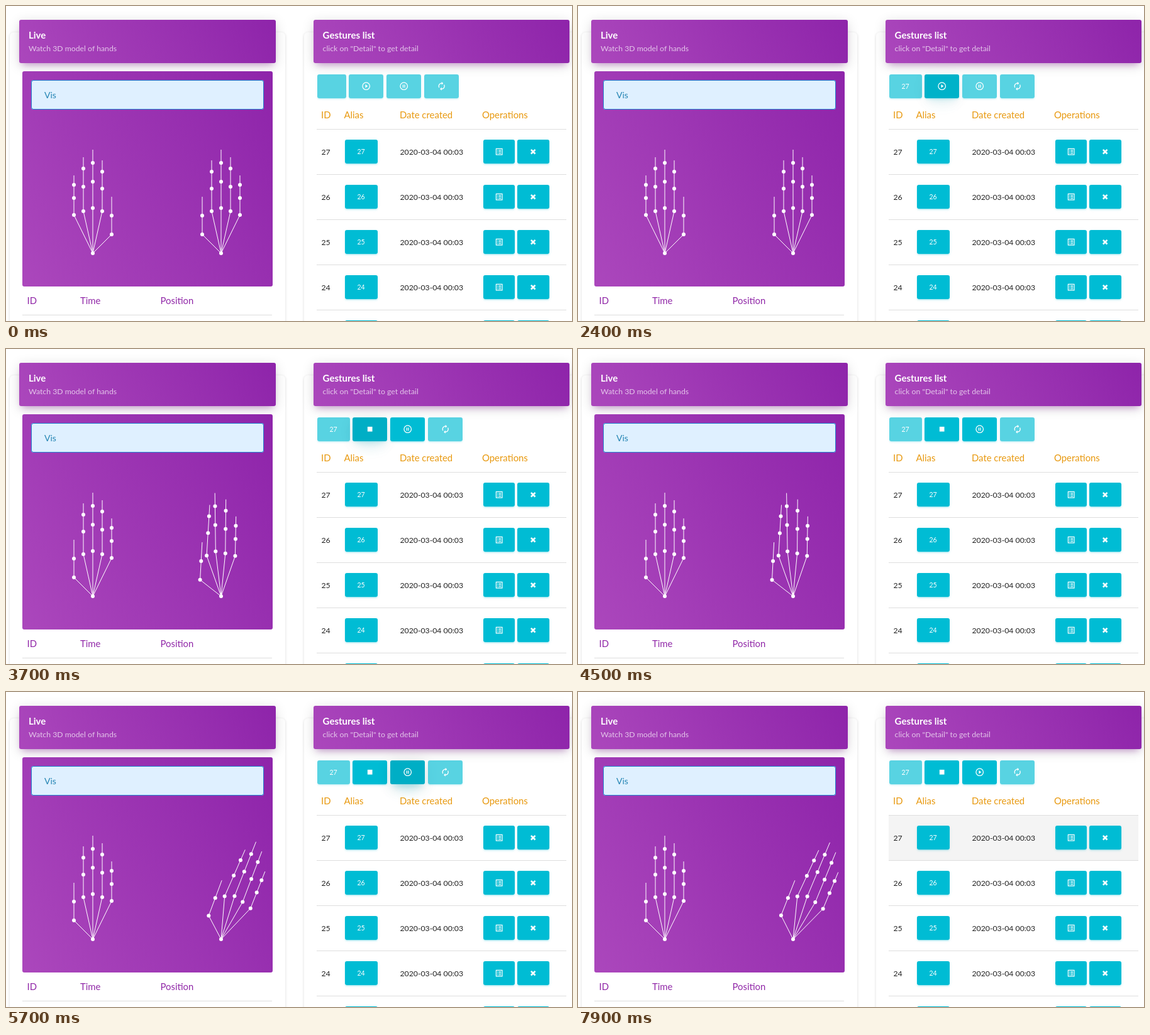
An HTML page with a canvas that plays this animation: 900 by 502 pixels, repeating every 8 s.

```html
<!DOCTYPE html>
<html lang="en">
<head>
<meta charset="utf-8">
<title>Gestures</title>
<style>
html, body { margin: 0; width: 100%; height: 100%; overflow: hidden; background: #fff; }
#stage { position: relative; width: 900px; height: 502px; overflow: hidden; font-family: Lato, sans-serif; }
#stage div, #stage span, canvas, svg { position: absolute; }
span { line-height: 20px; white-space: pre; }
.card { background: #fff; border-radius: 6px; box-shadow: 0 1px 4px rgba(0,0,0,.14); }
.purple { background: linear-gradient(60deg, #ab47bc, #8e24aa); border-radius: 3px; }
.head { box-shadow: 0 4px 20px rgba(0,0,0,.14), 0 7px 10px -5px rgba(156,39,176,.4); }
.vis { background: #dff0ff; border-radius: 4px; box-shadow: inset 0 0 0 1px #2185d0; }
.line { background: #dedede; }
.hover { background: #f4f4f4; }
.btn { border-radius: 3px; background: #00bcd4; }
svg { fill: #fff; stroke: none; }
svg .o { fill: none; stroke: #fff; stroke-width: 2; }
</style>
</head>
<body>
<div id="stage"></div>
<script>
const stage = document.getElementById('stage');
const LOOP = 8000, STEP = 100;
const TD = 12.25, TH = 14.875, SMALL = 10.5;
const INK = 'rgba(0,0,0,.87)', ORANGE = '#e8990f', PURPLE = '#9128a8';

const ring = '<circle class="o" cx="12" cy="12" r="9"/>';
const icons = {
  play: ring + '<path d="M10 7.5v9l6-4.5z"/>',
  pause: ring + '<path d="M9 8h2v8H9zM13 8h2v8h-2z"/>',
  stop: '<path d="M6 6h12v12H6z"/>',
  renew: '<path d="M12 6v3l4-4-4-4v3c-4.42 0-8 3.58-8 8 0 1.57.46 3.03 1.24 4.26L6.7 14.8c-.45-.83-.7-1.79-.7-2.8 0-3.31 2.69-6 6-6z"/>' +
    '<path d="M12 6v3l4-4-4-4v3c-4.42 0-8 3.58-8 8 0 1.57.46 3.03 1.24 4.26L6.7 14.8c-.45-.83-.7-1.79-.7-2.8 0-3.31 2.69-6 6-6z" transform="rotate(180 12 12)"/>',
  list: '<rect class="o" x="4" y="4" width="16" height="16"/><path d="M7 7h2v2H7zM7 11h2v2H7zM7 15h2v2H7zM11 7h6v2h-6zM11 11h6v2h-6zM11 15h6v2h-6z"/>',
  close: '<path class="o" style="stroke-width:4.4" d="M6.5 6.5l11 11M17.5 6.5l-11 11"/>'
};

function box(cls, x, y, w, h, parent = stage) {
  const el = document.createElement('div');
  el.className = cls;
  el.style.cssText = `left:${x}px;top:${y}px;width:${w}px;height:${h}px`;
  parent.append(el);
  return el;
}

function text(str, x, baseline, size, color, bold, parent = stage) {
  const el = document.createElement('span');
  const up = Math.round(size * .987), down = Math.round(size * .213);
  const top = baseline - up - Math.floor((20 - up - down) / 2);
  el.textContent = str;
  el.style.cssText = `left:${x}px;top:${top}px;font-size:${size}px;color:${color};font-weight:${bold ? 700 : 400}`;
  parent.append(el);
  return el;
}

function setIcon(btn, name, size = 15.4) {
  if (btn.icon === name) return;
  btn.icon = name;
  const x = (btn.offsetWidth - size) / 2, y = (38 - size) / 2;
  btn.innerHTML = `<svg viewBox="0 0 24 24" width="${size}" height="${size}" style="left:${x}px;top:${y}px">${icons[name]}</svg>`;
}

// Blend a button between rest (0) and hovered (1)
function setHover(btn, k, depth = k) {
  const tint = a => `rgba(0,188,212,${a})`;
  const rest = 1 - depth;
  btn.style.background = `rgb(0,${188 - 14 * k},${212 - 15 * k})`;
  btn.style.boxShadow = [
    `0 2px 2px ${tint(.14 * rest)}`, `0 3px 1px -2px ${tint(.2 * rest)}`, `0 1px 5px ${tint(.12 * rest)}`,
    `0 14px 26px -12px ${tint(.42 * depth)}`, `0 4px 23px rgba(0,0,0,${.12 * depth})`, `0 8px 10px -5px ${tint(.2 * depth)}`
  ].join();
}

function button(x, y, w, icon, size) {
  const el = box('btn', x, y, w, 38);
  setHover(el, 0);
  if (icon) setIcon(el, icon, size);
  return el;
}

function header(x, w, title, sub) {
  box('purple head', x, 22, w, 69);
  text(title, x + 15, 52, 15, '#fff', true);
  text(sub, x + 15, 72, TD, 'rgba(255,255,255,.7)');
}

// Left panel
box('card', 6, 42, 438, 520);
header(21, 408, 'Live', 'Watch 3D model of hands');
box('purple', 26, 104, 398, 343);
box('vis', 40, 118, 370, 47);
text('Vis', 61, 147, 14, '#2384b3');
text('ID', 33.5, 475, TH, PURPLE);
text('Time', 118, 475, TH, PURPLE);
text('Position', 245.5, 475, TH, PURPLE);
box('line', 26, 492, 397, 1);

// Right panel
box('card', 474, 42, 438, 520);
header(488.6, 407.4, 'Gestures list', 'click on "Detail" to get detail');
const rowBg = box('hover', 494, 197, 397, 71);
[['ID', 501], ['Alias', 537.5], ['Date created', 626], ['Operations', 757]]
  .forEach(([s, x]) => text(s, x, 179, TH, ORANGE));

const aliases = [];
for (let i = 0; i < 5; i++) {
  const y = 196 + 72 * i, id = String(27 - i);
  box('line', 494, y, 397, 1);
  text(id, 501.5, y + 41, TD, INK);
  const alias = button(539, y + 17, 52);
  text(id, 19.5, 23, SMALL, '#fff', false, alias);
  aliases.push(alias);
  text('2020-03-04 00:03', 626.5, y + 41, TD, INK);
  button(759, y + 17, 50, 'list', 14.4);
  button(813, y + 17, 51, 'close', 14.4);
}

const pick = button(495, 109, 46);
const label = text('27', 19.5, 23, SMALL, '#fff', false, pick);
const tools = [
  button(545, 109, 55, 'play'),
  button(605, 109, 55, 'pause'),
  button(665, 109, 55, 'renew')
];
pick.style.opacity = tools[2].style.opacity = .65;

// Hands
const canvas = document.createElement('canvas');
canvas.width = 398;
canvas.height = 343;
canvas.style.cssText = 'left:26px;top:104px';
stage.append(canvas);
const ctx = canvas.getContext('2d');
ctx.translate(-26, -104);
ctx.strokeStyle = ctx.fillStyle = '#fff';

// Side offset, then joint heights above the wrist, thumb first
const fingers = [
  [-30, 30, 60, 90],
  [-15, 67, 103, 130, 148],
  [0, 72, 114, 144, 165],
  [15, 67, 106, 135, 153],
  [30, 61, 88, 109, 124]
];
// Palm angle, then finger angles, in degrees
const flat = [0, 0, 0, 0, 0, 0];
const lean = [-7.1, 3, 3.3, -.9, .4, 1];
const tilt = [10.6, 13, 16.1, 13, 10, 14];
const far = [18.3, 21.4, 24.8, 22.7, 22.3, 22.5];

const clamp = v => Math.max(0, Math.min(1, v));
const ramp = (t, a, b) => clamp((t - a) / (b - a));
const pulse = (t, on, off) => ramp(t, on, on + 200) - ramp(t, off, off + 200);
const mix = (a, b, k) => a.map((v, i) => v + (b[i] - v) * k);
const rad = d => d * Math.PI / 180;

function dot(x, y) {
  ctx.beginPath();
  ctx.arc(x, y, 3, 0, 7);
  ctx.fill();
}

function drawHand(cx, side, pose) {
  const cy = 394, p = rad(pose[0]);
  dot(cx, cy);
  fingers.forEach(([off, base, ...rest], i) => {
    const a = rad(pose[i + 1]);
    const kx = off * Math.cos(p) + base * Math.sin(p);
    const ky = off * Math.sin(p) - base * Math.cos(p);
    const pts = [base, ...rest].map(h => [
      cx + side * (kx + (h - base) * Math.sin(a)),
      cy + ky - (h - base) * Math.cos(a)
    ]);
    ctx.beginPath();
    ctx.moveTo(cx, cy);
    pts.forEach(q => ctx.lineTo(...q));
    ctx.stroke();
    pts.slice(0, -1).forEach(q => dot(...q));
  });
}

function rightPose(t) {
  if (t < 2500) return flat;
  if (t < 4950) {
    const shake = .5 * Math.sin((t - 2800) / 850 * 2 * Math.PI);
    return lean.map(v => v + shake);
  }
  if (t < 5300) return mix(lean, tilt, ramp(t, 4950, 5300) ** 1.3);
  return mix(tilt, far, 1 - (1 - ramp(t, 5300, 6100)) ** 3);
}

function draw(t) {
  const picked = t >= 1700, playing = t >= 2500;
  ctx.clearRect(26, 104, 398, 343);
  drawHand(138, playing ? 1 : -1, flat);
  drawHand(342, 1, rightPose(t));

  rowBg.style.display = (t >= 900 && t < 2300) || t >= 7800 ? '' : 'none';
  setHover(aliases[0], pulse(t, 850, 2200));

  label.style.display = picked ? '' : 'none';
  pick.style.width = (picked ? 52 : 46) + 'px';
  tools.forEach((b, i) => b.style.left = 545 + 60 * i + (picked ? 6 : 0) + 'px');
  tools[0].style.opacity = picked ? 1 : .65;
  tools[1].style.opacity = playing ? 1 : .65;
  setIcon(tools[0], playing ? 'stop' : 'play');
  setIcon(tools[1], t >= 6100 ? 'play' : 'pause');
  const stopHover = pulse(t, 2250, 4100);
  setHover(tools[0], stopHover, stopHover * .6);
  setHover(tools[1], pulse(t, 5500, 7700));
}

const start = performance.now();
function tick() {
  const t = (performance.now() - start) % LOOP;
  draw(Math.floor(t / STEP) * STEP);
  requestAnimationFrame(tick);
}
tick();
</script>
</body>
</html>
```
